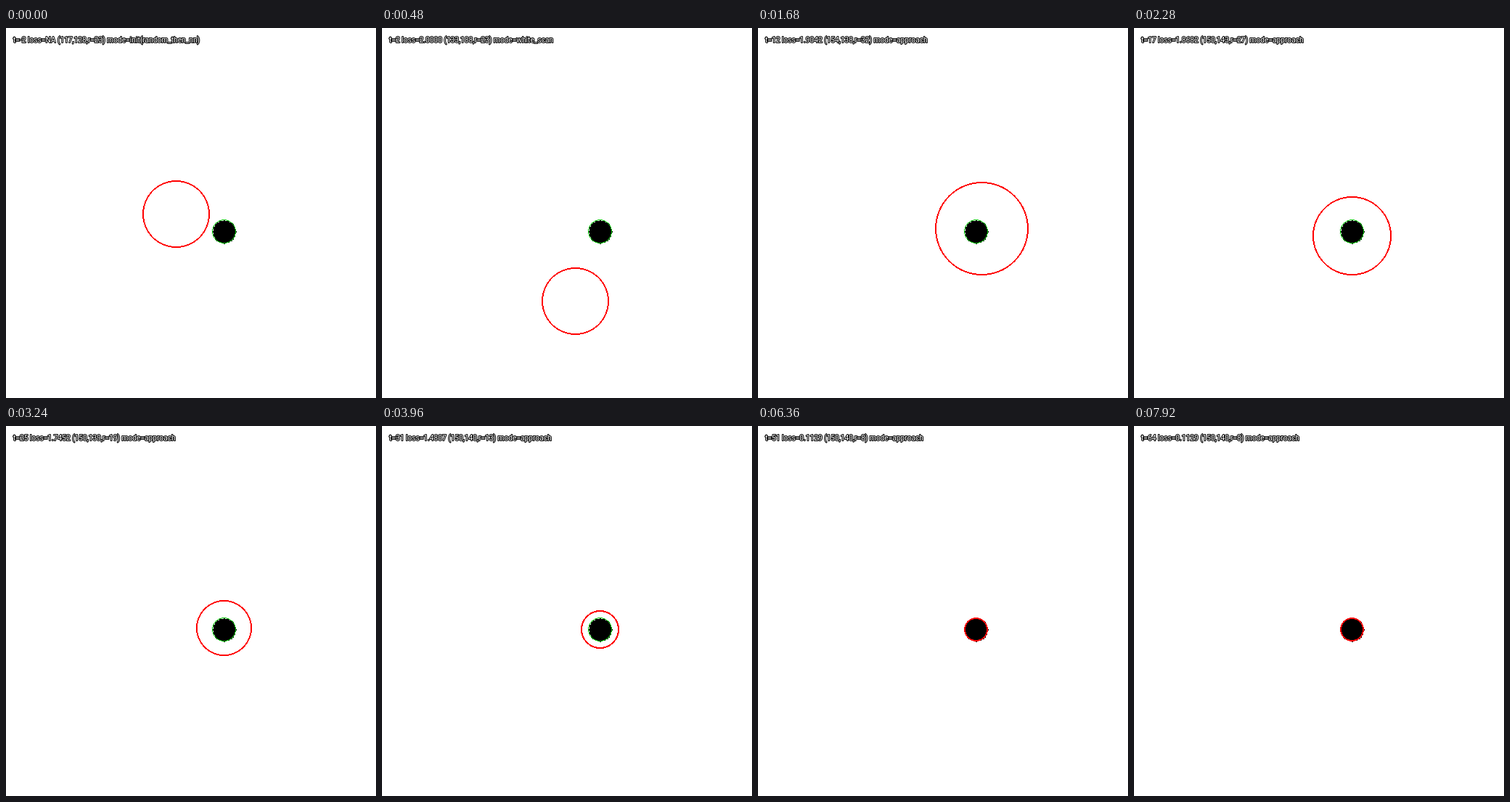
These frames come from a looping animation (510x510 px, 8000 ms). An HTML page with a canvas:

```html
<!DOCTYPE html>
<html lang="en">
<head>
<meta charset="utf-8">
<title>Circle search</title>
<style>
  html, body { margin: 0; width: 100%; height: 100%; overflow: hidden; background: #fff; }
  canvas { display: block; width: 510px; height: 510px; }
</style>
</head>
<body>
<canvas id="stage" width="510" height="510"></canvas>
<script>
const ctx = document.getElementById('stage').getContext('2d');
const LOOP = 8000, STEP = 120, SCALE = 2, SIZE = 255;
const SCAN = 2, APPROACH = 10;  // first step of each mode
const goal = { x: 150, y: 140, r: 8 };

// Move evenly from one value to another between two steps
function glide(step, from, to, a, b) {
  const k = Math.min(1, Math.max(0, (step - from) / (to - from)));
  return a + (b - a) * k;
}

// Sweep down to the bottom edge in a shallow arc
function scan(step) {
  const r = 23;
  return { x: 117 + 17 * Math.sin(0.302 * step), y: Math.min(SIZE - 1 - r, 128 + 15 * step), r };
}

// Rush to the goal, overshoot, then settle while the radius shrinks
function approach(step) {
  const x = step < 14 ? glide(step, APPROACH, 14, 134, 154) : glide(step, 14, 18, 154, goal.x);
  const y = step < 14 ? glide(step, APPROACH, 14, 219, 138)
    : step < 20.5 ? glide(step, 14, 20.5, 138, 144)
    : step < 26.5 ? glide(step, 20.5, 26.5, 144, 139)
    : glide(step, 26.5, 30, 139, goal.y);
  return { x, y, r: Math.max(goal.r, 46 - step) };
}

function probeAt(step) {
  const { x, y, r } = step < APPROACH ? scan(step) : approach(step);
  return { x: Math.round(x), y: Math.round(y), r };
}

function lossAt(step, r) {
  if (step < SCAN) return 'NA';
  if (step < APPROACH) return '2.0000';
  return (r > goal.r ? 2 - 0.2548 * (19 / r) ** 1.876 : 0.1129).toFixed(4);
}

function modeAt(step) {
  if (step < SCAN) return 'init(random_then_nn)';
  return step < APPROACH ? 'white_scan' : 'approach';
}

// Hard-edged ring, built from one octant and mirrored
function ring({ x, y, r }, width, color) {
  const cx = x * SCALE, cy = y * SCALE, R = r * SCALE;
  const edge = (radius, m) => Math.round(Math.sqrt(radius * radius - m * m));
  ctx.fillStyle = color;
  for (let m = 0; m <= edge(R, m); m++) {
    for (let n = Math.max(m, edge(R - width + 1, m)); n <= edge(R, m); n++) {
      for (const [dx, dy] of [[m, n], [n, m]]) {
        for (const sx of [-1, 1]) {
          for (const sy of [-1, 1]) ctx.fillRect(cx + sx * dx, cy + sy * dy, 1, 1);
        }
      }
    }
  }
}

// Filled disc on the coarse grid
function disc({ x, y, r }) {
  ctx.fillStyle = '#000';
  for (let dy = -r; dy <= r; dy++) {
    const half = Math.floor(Math.sqrt(r * r - dy * dy));
    ctx.fillRect((x - half) * SCALE, (y + dy) * SCALE, (2 * half + 1) * SCALE, SCALE);
  }
}

function label(text) {
  ctx.font = '10.2px Roboto, sans-serif';
  ctx.lineJoin = 'round';
  ctx.lineWidth = 2;
  ctx.strokeStyle = '#000';
  ctx.strokeText(text, 10, 20);
  ctx.fillStyle = '#fff';
  ctx.fillText(text, 10, 20);
}

function draw(ms) {
  const step = Math.floor((ms % LOOP) / STEP);
  const p = probeAt(step);
  ctx.fillStyle = '#fff';
  ctx.fillRect(0, 0, 510, 510);
  disc(goal);
  ring(goal, 1, '#00c800');
  ring(p, 2, '#f00');
  label(`t=${step - 2} loss=${lossAt(step, p.r)} (${p.x},${p.y},r=${p.r}) mode=${modeAt(step)}`);
}

const start = performance.now();
function tick() {
  draw(performance.now() - start);
  requestAnimationFrame(tick);
}
tick();
</script>
</body>
</html>
```
